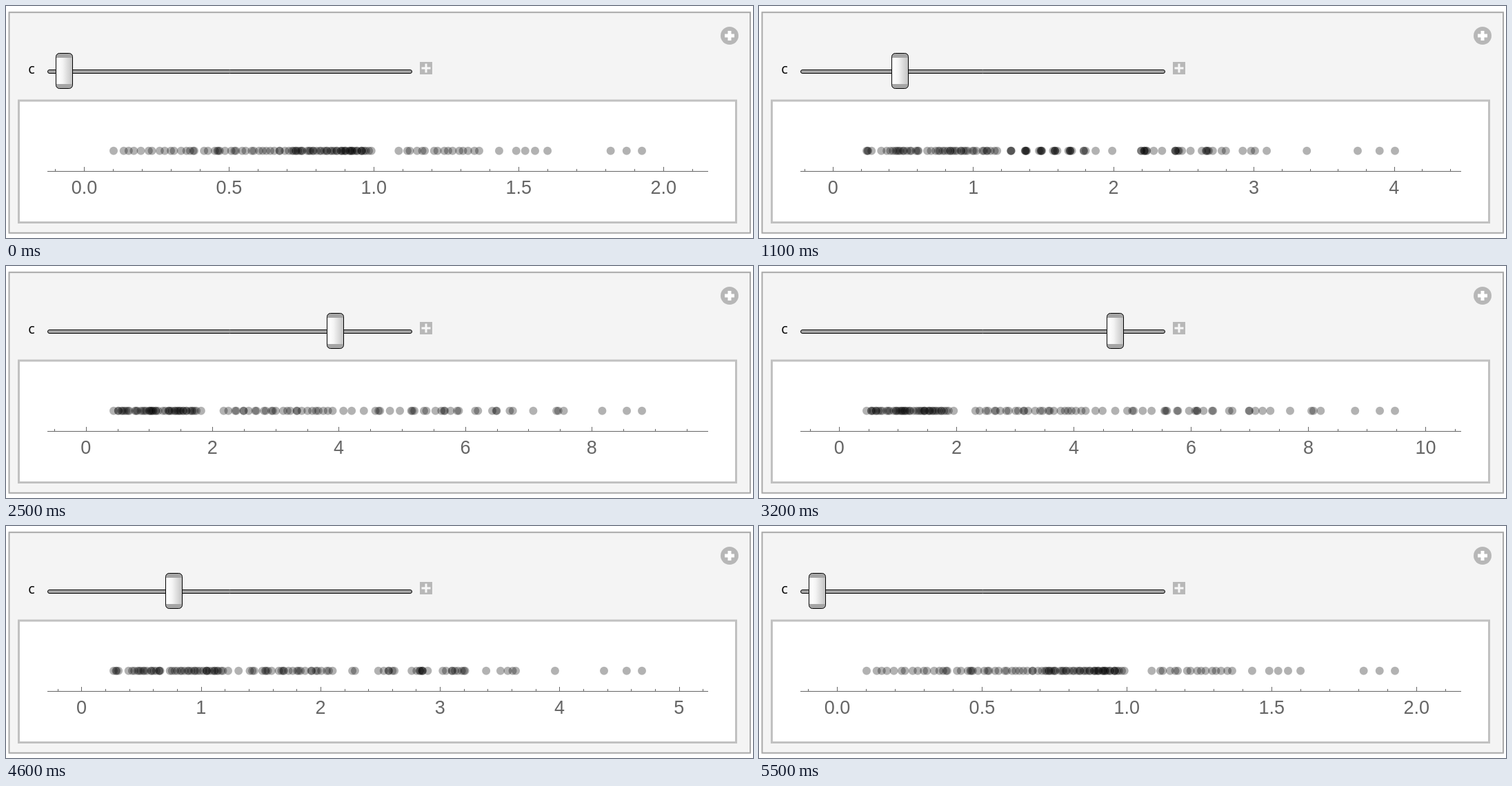
These frames come from a looping animation (1083x336 px, 6000 ms). An HTML page with a canvas:

```html
<!DOCTYPE html>
<html lang="en">
<head>
<meta charset="utf-8">
<title>Number line</title>
<style>
html, body { margin: 0; height: 100%; overflow: hidden; background: #fff; }
canvas { display: block; }
</style>
</head>
<body>
<canvas id="stage" width="1083" height="336"></canvas>
<script>
const ctx = document.getElementById('stage').getContext('2d');
const lerp = (a, b, t) => a + (b - a) * t;

let seed = 7;
function random() {
  seed = (seed * 16807) % 2147483647;
  return seed / 2147483647;
}

// Each point is [start, value at SPAN] and moves evenly with the slider.
// The outermost points are given, since they set the scale of the axis.
const SPAN = 0.8983;
const points = [
  [0.1, 0.62], [0.135, 0.541], [0.152, 0.459],
  [1.924, 9.47], [1.871, 9.212], [1.816, 8.79], [1.598, 8.047],
  [1.555, 6.065], [1.521, 7.212], [1.49, 6.988], [1.431, 5.77],
  [0.99, 8.203], [0.955, 8.08], [0.9, 7.682], [0.364, 7.09]
];

// Covers both ranges evenly, pairing starts and ends in a scattered order.
function scatter(n, x0, x1, v0, v1) {
  for (let i = 0; i < n; i++) {
    const t = (i + random()) / n;
    const u = (i * 5 % n + random()) / n;
    points.push([lerp(x0, x1, t), lerp(v0, v1, u)]);
  }
}
scatter(16, 0.17, 0.47, 0.5, 1.2);
scatter(21, 0.45, 0.75, 0.95, 1.95);
scatter(7, 0.86, 0.97, 1.33, 1.75);
scatter(27, 0.72, 0.99, 2.3, 4.2);
scatter(6, 0.63, 0.92, 5, 7.4);
scatter(16, 1.08, 1.37, 4.3, 6.8);

function rect(x, y, w, h, fill) {
  ctx.fillStyle = fill;
  ctx.fillRect(x, y, w, h);
}

function pill(x, y, w, h, r) {
  ctx.beginPath();
  ctx.roundRect(x, y, w, h, r);
  ctx.fillStyle = '#a5a5a5';
  ctx.fill();
  ctx.lineWidth = 1;
  ctx.strokeStyle = '#000';
  ctx.stroke();
}

function disc(x, y, r, fill) {
  ctx.beginPath();
  ctx.arc(x, y, r, 0, 7);
  ctx.fillStyle = fill;
  ctx.fill();
}

function plus(x, y, size, weight, fill) {
  rect(x - size / 2, y - weight / 2, size, weight, fill);
  rect(x - weight / 2, y - size / 2, weight, size, fill);
}

function frame(x, y, w, h, weight, line, fill) {
  rect(x, y, w, h, line);
  rect(x + weight, y + weight, w - 2 * weight, h - 2 * weight, fill);
}

function drawPanel() {
  rect(0, 0, 1083, 336, '#fff');
  frame(3.5, 8.2, 1076.5, 321.5, 2, '#a9a9a9', '#f4f4f4');
  frame(17, 135.5, 1043, 179.5, 3, '#c1c1c1', '#fff');
  disc(1049, 43, 13, '#b7b7b7');
  plus(1049, 43, 14, 5, '#fff');
  rect(600, 81, 18, 18, '#b8b8b8');
  plus(609, 90, 13, 3, '#f8f8f8');
  ctx.fillStyle = '#000';
  ctx.font = '20px "Open Sans", "Noto Sans", sans-serif';
  ctx.textAlign = 'center';
  ctx.fillText('c', 37, 98);
}

function drawSlider(p) {
  pill(60.5, 92.5, 528, 5, 2.5);
  const x = Math.ceil(72 + 480.9 * p) + 0.5;
  pill(x, 68.5, 24, 51, 5);
  const shade = ctx.createLinearGradient(x, 0, x + 24, 0);
  shade.addColorStop(0.1, '#fff');
  shade.addColorStop(0.4, '#f4f4f4');
  shade.addColorStop(1, '#c2c2c2');
  rect(x + 0.5, 75, 23, 38, shade);
}

function drawPlot(p) {
  const values = points.map(([a, b]) => lerp(a, b, p / SPAN));
  const min = Math.min(...values);
  const scale = 766 / (Math.max(...values) - min);
  const toX = v => 156 + (v - min) * scale;
  for (const v of values) disc(toX(v), 209.8, 6, 'rgba(0,0,0,0.3)');

  const range = 958 / scale;
  const step = range < 4.5 ? 0.5 : range < 9.8 ? 1 : 2;
  const parts = step === 2 ? 4 : 5;
  const minor = step / parts;
  rect(60, 239, 958, 1, '#666');
  ctx.font = '27px "Liberation Sans", Arial, sans-serif';
  for (let k = -parts; toX(k * minor) <= 1018; k++) {
    const x = toX(k * minor);
    if (x < 60) continue;
    const major = k % parts === 0;
    const height = major ? 6 : 3;
    rect(Math.round(x - 0.8), 239 - height, 1, height, '#666');
    if (major) ctx.fillText((k * minor).toFixed(step < 1 ? 1 : 0), x - 0.6, 272);
  }
}

function draw(now) {
  // 60 steps there and back, resting at the low end
  const step = Math.floor(now % 6000 / 100);
  const p = Math.max(0, (Math.min(step, 59 - step) / 29.5 * 6 - 1) / 5);
  drawPanel();
  drawSlider(p);
  drawPlot(p);
}

const begin = performance.now();
function tick() {
  draw(performance.now() - begin);
  requestAnimationFrame(tick);
}
tick();
</script>
</body>
</html>
```
